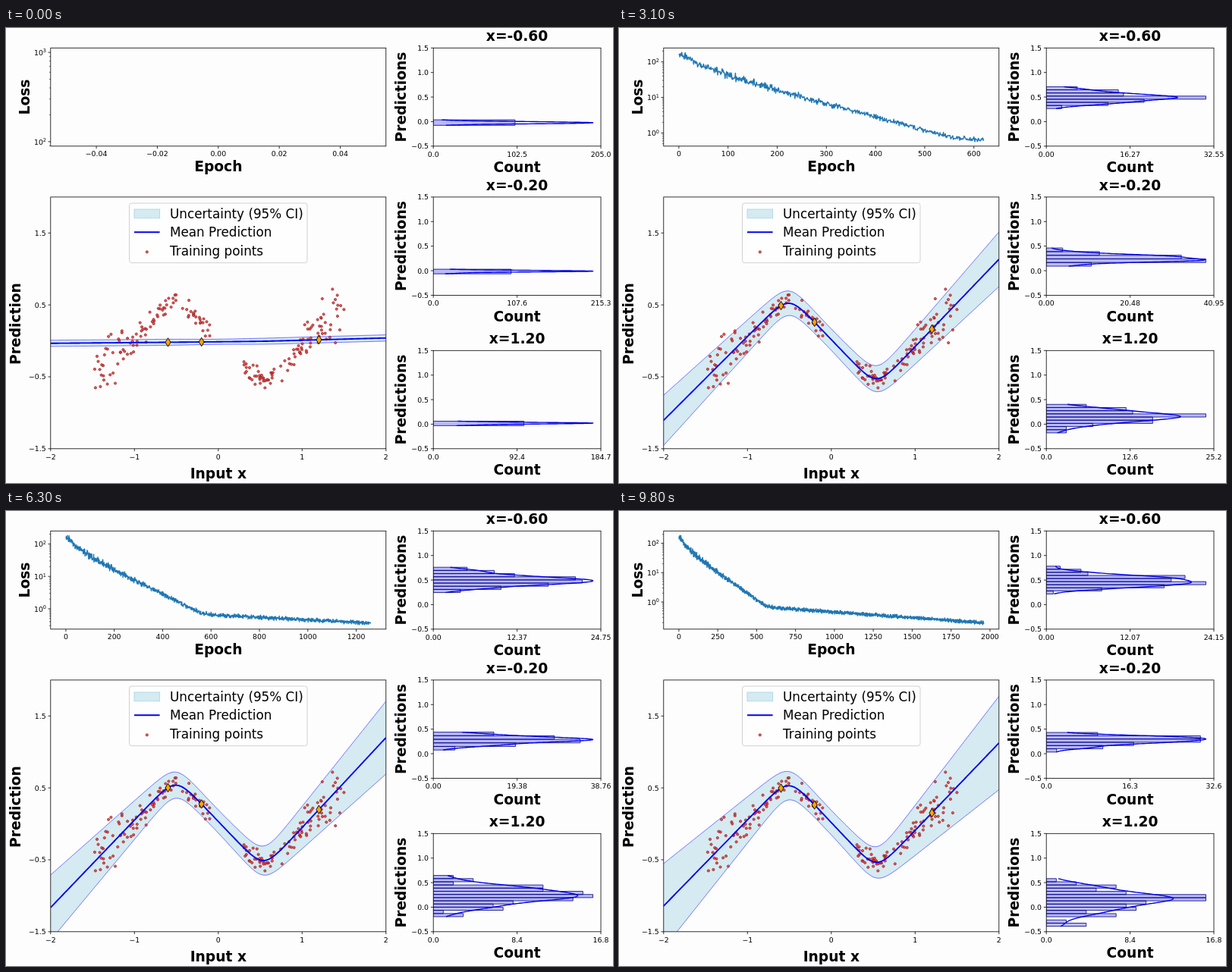
These frames come from a looping animation (800 by 600 pixels, 9.9 s). An HTML page:

```html
<!DOCTYPE html>
<html lang="en">
<head>
<meta charset="utf-8">
<title>Training with uncertainty</title>
<style>
html, body { margin: 0; width: 100%; height: 100%; overflow: hidden; background: #fdfdfd; }
svg { display: block; width: 800px; height: 600px; }
text { font: 9.33px "DejaVu Sans", sans-serif; fill: #000; }
.label { font-size: 18.67px; font-weight: bold; text-anchor: middle; }
.legend { font-size: 16.8px; }
.end { text-anchor: end; }
.mid { text-anchor: middle; }
.axis { fill: none; stroke: #000; stroke-width: .8; }
.minor { fill: none; stroke: #000; stroke-width: .55; }
.band { fill: #add8e6; fill-opacity: .5; }
.edge { fill: none; stroke: #0000ff; stroke-width: .65; stroke-opacity: .8; }
.mean { fill: none; stroke: #0000f0; stroke-width: 1.87; stroke-linejoin: round; }
.kde { fill: none; stroke: #0000e6; stroke-width: 1.4; stroke-linejoin: round; }
.bar { fill: #0000ff; fill-opacity: .27; stroke: #00007d; stroke-width: .95; stroke-opacity: .85; }
.loss { fill: none; stroke: #1f77b4; stroke-width: 1.4; stroke-linejoin: round; }
.dot { fill: #f03c3c; fill-opacity: .85; stroke: #8b1616; stroke-width: .7; }
.mark { fill: #ffa500; stroke: #000; stroke-width: .95; }
</style>
</head>
<body>
<script>
const NS = 'http://www.w3.org/2000/svg';
const STEP = 100, COUNT = 99, EPOCHS = 20;
const L = 58.8, R = 500.8, HL = 563.2, HR = 784, H = 129.5;
const TOP = 26.3, MT = 222.9, MB = 554.8;
const BIN = 0.062, SAMPLES = 100;

function add(parent, tag, attrs, text) {
  const node = document.createElementNS(NS, tag);
  for (const name in attrs) node.setAttribute(name, attrs[name]);
  if (text !== undefined) node.textContent = text;
  parent.appendChild(node);
  return node;
}
const svg = add(document.body, 'svg', { viewBox: '0 0 800 600', width: 800, height: 600 });
const group = attrs => add(svg, 'g', attrs || {});
const path = (parent, cls, d) => add(parent, 'path', { class: cls, d: d || '' });
const label = (parent, x, y, cls, s) => add(parent, 'text', { x, y, class: cls }, s);
const upright = (parent, x, y, s) =>
  add(parent, 'text', { class: 'label', transform: `translate(${x} ${y}) rotate(-90)` }, s);
const minus = s => String(s).replace('-', '\u2212');
const line = pts => 'M' + pts.map(p => p[0].toFixed(2) + ' ' + p[1].toFixed(2)).join('L');

function clip(id, x, y, w, h) {
  add(add(svg, 'clipPath', { id }), 'rect', { x, y, width: w, height: h });
  return `url(#${id})`;
}
function rand(n) {
  const v = Math.sin(n * 12.9898 + 4.1414) * 43758.5453;
  return v - Math.floor(v);
}
// Seeded normal value, kept within a limit
function gauss(n, limit) {
  const g = Math.sqrt(-2 * Math.log(rand(n) + 1e-9)) * Math.cos(2 * Math.PI * rand(n + 0.37));
  return Math.max(-limit, Math.min(limit, g));
}

// Linear interpolation of rows [key, v1, v2, ...]
function mix(rows, key) {
  let i = 1;
  while (i < rows.length - 1 && rows[i][0] < key) i++;
  const a = rows[i - 1], b = rows[i], u = (key - a[0]) / (b[0] - a[0]);
  return a.slice(1).map((v, j) => v + (b[j + 1] - v) * u);
}

/* ---- model: mean and half width at x = -2, two bends and x = 2 ---- */
const BENDS = [-0.507, 0.54], SOFT = 0.068;
const FIT = [
  [0, -.034, -.019, -.006, .04, .043, .043, .043, .044],
  [18, -.188, .24, -.315, .55, .245, .145, .15, .263],
  [31, -1.105, .635, -.64, 1.135, .35, .17, .18, .38],
  [53, -1.17, .655, -.62, 1.22, .415, .175, .195, .465],
  [98, -1.142, .645, -.65, 1.125, .59, .19, .21, .65]
];
const ramp = (u, w) => w * Math.log(1 + Math.exp(u / w));
function bent(x, [a, b, c, d]) {
  const [p, q] = BENDS;
  const s1 = (b - a) / (p + 2), s2 = (c - b) / (q - p), s3 = (d - c) / (2 - q);
  return a + s1 * (x + 2) + (s2 - s1) * ramp(x - p, SOFT) + (s3 - s2) * ramp(x - q, SOFT);
}
const meanAt = (x, f) => bent(x, f.slice(0, 4));
const halfAt = (x, f) => bent(x, f.slice(4)) - 0.15 * f[5] * Math.exp(-6 * x * x);

/* ---- loss: log10 per epoch, a steep phase that runs into a slow one ---- */
function lossAt(e) {
  const steep = 2.25 - 0.00375 * e - 0.3 * (1 - Math.exp(-e / 60));
  const slow = 0.04 - 0.00038 * e;
  const amp = 0.03 + 0.032 * Math.exp(-e / 300);
  return slow + ramp(steep - slow, 0.05) + amp * gauss(e + 50, 2.3);
}
const loss = Array.from({ length: EPOCHS * (COUNT - 1) + 1 }, (_, e) => lossAt(e));

const lossLine = path(group({ 'clip-path': clip('c-loss', L, TOP, R - L, H) }), 'loss');
const lossTicks = group();
const lossName = upright(svg, 31, 91, 'Loss');
add(svg, 'rect', { class: 'axis', x: L, y: TOP, width: R - L, height: H });
label(svg, 279.8, 189.3, 'label', 'Epoch');

function drawLoss(k) {
  const last = k * EPOCHS, empty = k === 0;
  const data = loss.slice(0, last + 1);
  let lo = empty ? 2 : Math.min(...data), hi = empty ? 3 : Math.max(...data);
  const pad = 0.05 * (hi - lo);
  lo -= pad;
  hi += pad;
  const x0 = empty ? -0.055 : -0.05 * last, x1 = empty ? 0.055 : 1.05 * last;
  const px = e => L + (e - x0) / (x1 - x0) * (R - L);
  const py = v => TOP + (hi - v) / (hi - lo) * H;
  lossLine.setAttribute('d', empty ? '' : line(data.map((v, e) => [px(e), py(v)])));

  lossTicks.textContent = '';
  let major = '', minor = '';
  const rough = (x1 - x0) / 9, power = 10 ** Math.floor(Math.log10(rough));
  const step = power * [1, 2, 2.5, 5, 10].find(m => m * power >= rough - 1e-9);
  const digits = empty ? 2 : step % 1 ? 1 : 0;
  for (let i = Math.ceil(x0 / step); i * step <= x1; i++) {
    const x = px(i * step);
    major += `M${x} ${TOP + H}v3.3`;
    label(lossTicks, x, 169.4, 'mid', minus((i * step).toFixed(digits)));
  }
  // Short ranges also name some minor ticks
  const range = hi - lo;
  const named = m => m === 1 || range <= 0.4 || range <= 1 && [2, 3, 4, 6].includes(m);
  let wide = false;
  for (let p = -1; p <= 3; p++) {
    for (let m = 1; m < 10; m++) {
      const v = p + Math.log10(m);
      if (v < lo || v > hi) continue;
      const y = py(v);
      if (m === 1) major += `M${L} ${y}h-3.3`;
      else minor += `M${L} ${y}h-1.9`;
      if (!named(m)) continue;
      if (m > 1) wide = true;
      const t = label(lossTicks, 53, y + 3.8, 'end', (m > 1 ? m + '\u00d7' : '') + '10');
      add(t, 'tspan', { dy: -3.5, style: 'font-size:6.5px' }, minus(p));
    }
  }
  path(lossTicks, 'axis', major);
  path(lossTicks, 'minor', minor);
  lossName.setAttribute('transform', `translate(${wide ? 19 : 31} 91) rotate(-90)`);
}

/* ---- prediction panel ---- */
const PANELS = [
  { x: -0.6, title: 'x=-0.60', top: TOP },
  { x: -0.2, title: 'x=-0.20', top: MT },
  { x: 1.2, title: 'x=1.20', top: MB - H }
];
const mx = x => L + (x + 2) / 4 * (R - L);
const my = v => MT + (2 - v) / 3.5 * (MB - MT);
const plot = group({ 'clip-path': clip('c-main', L, MT, R - L, MB - MT) });
const band = path(plot, 'band');
const edges = [path(plot, 'edge'), path(plot, 'edge')];
const dots = add(plot, 'g', { class: 'dot' });
const meanLine = path(plot, 'mean');
const marks = PANELS.map(() => path(plot, 'mark'));

// Training points follow the settled curve, noisier far from the centre
const settled = mix(FIT, 90);
function scatter(n, seed, from, to, skew) {
  for (let i = 0; i < n; i++) {
    const x = from + (to - from) * rand(seed + i) ** skew;
    const noise = 0.075 + 0.15 * Math.max(0, Math.abs(x) - 0.7);
    const v = meanAt(x, settled) + noise * gauss(seed + 200 + i, 2.4);
    add(dots, 'circle', { cx: mx(x).toFixed(1), cy: my(v).toFixed(1), r: 1.6 });
  }
}
scatter(100, 700, -1.5, -0.1, 1);
scatter(100, 1700, 0.3, 1.5, 1.3);

add(svg, 'rect', { class: 'axis', x: L, y: MT, width: R - L, height: MB - MT });
let mainTicks = '';
for (let x = -2; x <= 2; x++) {
  mainTicks += `M${mx(x)} ${MB}v3.3`;
  label(svg, mx(x), 569, 'mid', minus(x));
}
for (let v = -1.5; v < 2; v++) {
  mainTicks += `M${L} ${my(v)}h-3.3`;
  label(svg, 52.6, my(v) + 3.5, 'end', minus(v));
}
path(svg, 'axis', mainTicks);
label(svg, 279.8, 593.5, 'label', 'Input x');
upright(svg, 19, 390, 'Prediction');

const legend = group();
add(legend, 'rect', { x: 162.5, y: 231, width: 234.5, height: 78.7, rx: 3.3,
  fill: '#fff', 'fill-opacity': .8, stroke: '#ccc', 'stroke-width': .9 });
add(legend, 'rect', { class: 'band', x: 169, y: 239, width: 33.6, height: 11.7,
  stroke: '#add8e6', 'stroke-width': .9 });
path(legend, 'mean', 'M169 269.2h33.6');
add(legend, 'circle', { class: 'dot', cx: 185.8, cy: 295.3, r: 1.6 });
['Uncertainty (95% CI)', 'Mean Prediction', 'Training points'].forEach((s, i) =>
  label(legend, 216, 250.6 + 24.7 * i, 'legend', s));

function drawFit(f) {
  const mid = [], up = [], down = [];
  for (let i = 0; i <= 200; i++) {
    const x = -2 + i / 50, m = meanAt(x, f), h = halfAt(x, f);
    mid.push([mx(x), my(m)]);
    up.push([mx(x), my(m + h)]);
    down.push([mx(x), my(m - h)]);
  }
  meanLine.setAttribute('d', line(mid));
  edges[0].setAttribute('d', line(up));
  edges[1].setAttribute('d', line(down));
  band.setAttribute('d', line(up.concat(down.reverse())) + 'Z');
  PANELS.forEach((p, i) => marks[i].setAttribute('d',
    `M${mx(p.x)} ${my(meanAt(p.x, f)) - 5.7}l3.5 5.7l-3.5 5.7l-3.5 -5.7Z`));
}

/* ---- histogram panels ---- */
PANELS.forEach((p, i) => {
  const bottom = p.top + H;
  p.y = v => p.top + (1.5 - v) / 2 * H;
  const area = group({ 'clip-path': clip('c-hist' + i, HL, p.top, HR - HL, H) });
  p.bars = path(area, 'bar');
  p.kde = path(area, 'kde');
  add(svg, 'rect', { class: 'axis', x: HL, y: p.top, width: HR - HL, height: H });
  let ticks = '';
  for (let v = -0.5; v <= 1.5; v += 0.5) {
    ticks += `M${HL} ${p.y(v)}h-3.3`;
    label(svg, 557, p.y(v) + 3.5, 'end', minus(v.toFixed(1)));
  }
  p.labels = [0, 0.5, 1].map(u => {
    const x = HL + u * (HR - HL);
    ticks += `M${x} ${bottom}v3.3`;
    return label(svg, x, bottom + 13.7, 'mid', '');
  });
  path(svg, 'axis', ticks);
  label(svg, 673.6, p.top - 9, 'label', p.title);
  label(svg, 673.6, bottom + 34.2, 'label', 'Count');
  upright(svg, 526.8, p.top + H / 2, 'Predictions');
});

// Samples around the mean, their bins from the top, and a smoothed density
function histogram(x, seed, f) {
  const mid = meanAt(x, f), spread = halfAt(x, f) / 1.96;
  const values = Array.from({ length: SAMPLES }, (_, i) => mid + spread * gauss(seed + i, 2.6));
  const high = Math.max(...values), low = Math.min(...values);
  const counts = new Array(Math.max(1, Math.floor((high - low) / BIN))).fill(0);
  const w = (high - low) / counts.length;
  for (const v of values) counts[Math.min(counts.length - 1, Math.floor((high - v) / w))]++;

  const width = spread * SAMPLES ** -0.2, curve = [];
  for (let i = 0; i <= 160; i++) {
    const v = low + (high - low) * i / 160;
    const sum = values.reduce((s, u) => s + Math.exp(-0.5 * ((v - u) / width) ** 2), 0);
    curve.push([sum * w / (width * Math.sqrt(2 * Math.PI)), v]);
  }
  const max = 1.05 * Math.max(...counts, ...curve.map(c => c[0]));
  return { high, w, counts, curve, max: Number(max.toFixed(6)) };
}

// Fewest decimals that still show every tick well enough
function decimals(ticks) {
  const order = Math.floor(Math.log10(ticks[ticks.length - 1]));
  const limit = 10 ** (order - 3);
  let n = Math.max(0, 3 - order);
  while (n > 0 && ticks.every(t => Math.abs(t - Number(t.toFixed(n - 1))) < limit)) n--;
  return n;
}

function drawHist(p, seed, f) {
  const h = histogram(p.x, seed, f);
  const px = n => HL + n / h.max * (HR - HL);
  p.bars.setAttribute('d', h.counts.map((n, j) => {
    const y0 = p.y(h.high - j * h.w), y1 = p.y(h.high - (j + 1) * h.w);
    return n ? `M${HL} ${y0}H${px(n)}V${y1}H${HL}Z` : '';
  }).join(''));
  p.kde.setAttribute('d', line(h.curve.map(([n, v]) => [px(n), p.y(v)])));
  const ticks = [0, h.max / 2, h.max], n = decimals(ticks);
  p.labels.forEach((t, j) => { t.textContent = ticks[j].toFixed(n); });
}

/* ---- clock ---- */
let shown = -1;
function draw(k) {
  const f = mix(FIT, k);
  drawLoss(k);
  drawFit(f);
  PANELS.forEach((p, i) => drawHist(p, 3000 + k * 400 + i * 130, f));
}
const start = performance.now();
function tick() {
  const k = Math.floor(Math.max(0, performance.now() - start) / STEP) % COUNT;
  if (k !== shown) draw(shown = k);
  requestAnimationFrame(tick);
}
tick();
</script>
</body>
</html>
```
